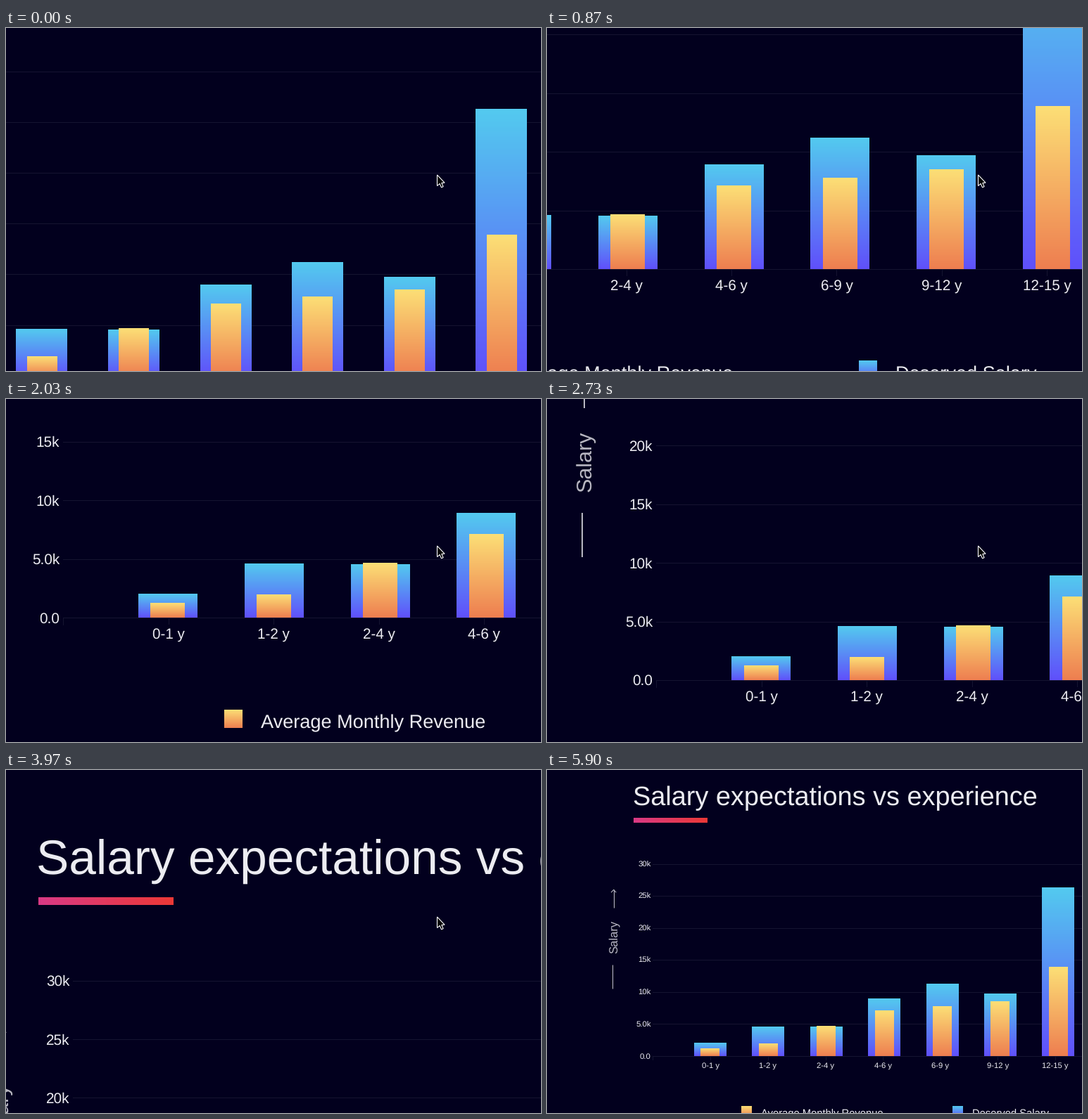
A matplotlib script that plays this animation: 760x488 px, repeating every 5930 ms.

```python
import numpy as np
import matplotlib
import matplotlib.pyplot as plt
from matplotlib.animation import FuncAnimation
from matplotlib.patches import Polygon
from matplotlib.transforms import Affine2D

W, H, DPI = 760, 488, 100
LOOP, FRAMES = 5930, 178
PT = 72 / DPI

BG = "#02001e"
GRID = "#151430"
INK = "#ececf1"
GREY = "#b9b8c2"
BLUE = ("#53caef", "#6050fb")
GOLD = ("#fcdf76", "#ee7e50")
PINK = ("#d93a86", "#ec3836")

K = 16.68          # height of one thousand
PITCH = 150.8      # distance between bars
YEARS = [0, 1, 2, 4, 6, 9, 12, 15]
DESERVED = [2, 4.6, 4.5, 8.93, 11.2, 9.7, 26.3]
REVENUE = [1.2, 1.92, 4.65, 7.08, 7.75, 8.5, 13.85]

matplotlib.rcParams["font.family"] = "Liberation Sans"
matplotlib.rcParams["text.hinting"] = "none"

fig = plt.figure(figsize=(W / DPI, H / DPI), dpi=DPI, facecolor=BG)
ax = fig.add_axes([0, 0, 1, 1])
ax.axis("off")

cam = Affine2D()
world = cam + ax.transData
texts, strokes = [], []


def gradient(x, y, w, h, colors, z=2, across=False):
    a, b = (np.array(matplotlib.colors.to_rgb(c)) for c in colors)
    k = np.linspace(0, 1, 160)[:, None, None]
    ramp = np.repeat(a + (b - a) * k, 2, axis=1)
    if across:
        ramp = ramp.transpose(1, 0, 2)
    im = ax.imshow(ramp, extent=(x, x + w, y + h, y), aspect="auto",
                   interpolation="nearest", zorder=z)
    im.set_transform(world)


def label(x, y, s, px, color=INK, **kw):
    t = ax.text(x, y, s, color=color, va="baseline", transform=world,
                zorder=4, clip_on=True, **kw)
    texts.append((t, px * PT))


def grid(xs, ys):
    ax.plot(xs, ys, color=GRID, lw=PT, transform=world, zorder=1)


def stroke(xs, ys):
    line, = ax.plot(xs, ys, color=GREY, transform=world, zorder=1,
                    solid_capstyle="butt", solid_joinstyle="miter")
    strokes.append(line)


def legend(x, s, colors):
    gradient(x, 131, 26, 26, colors)
    label(x + 51.5, 157, s, 27.1)


def build():
    for k in range(0, 31, 5):
        grid([-107, 1200], [-K * k, -K * k])
        s = f"{k}k" if k > 5 else f"{k:.1f}" + "k" * (k > 0)
        label(-112, 7.3 - K * k, s, 20.8, ha="right")
    grid([-107, -107], [0, 10])

    for i, (big, small) in enumerate(zip(DESERVED, REVENUE)):
        x, mid = PITCH * i, 43 + 149.3 * i
        gradient(x, -K * big, 83.5, K * big, BLUE)
        gradient(x + 17.5, -K * small, 48.5, K * small, GOLD, 3)
        grid([mid, mid], [0, 9])
        label(mid, 30.3, f"{YEARS[i]}-{YEARS[i + 1]} y", 20.6, ha="center")

    label(-159, -652.5, "Salary expectations vs experience", 69.4)
    gradient(-156.5, -619, 192, 11, PINK, across=True)

    label(-200, -268, "Salary", 30.5, GREY, rotation=90,
          rotation_mode="anchor", ha="left")
    stroke([-212, -212], [-238, -175])
    stroke([-209, -209], [-387, -433])
    stroke([-215.5, -209, -202.5], [-426, -433, -426])

    legend(122.5, "Average Monthly Revenue", GOLD)
    legend(671.8, "Deserved Salary", BLUE)


def ease(t, start, end):
    u = np.clip((t - start) / (end - start), 0, 1)
    return u * u * (3 - 2 * u)


def camera(t):
    """Zoom about an anchor, on top of the scroll position."""
    zoom = .866 + .134 * ease(t, 17, 400) - .4535 * ease(t, 4830, 5381)
    x = -229 + 491 * ease(t, 862, 2390) - 152 * ease(t, 3620, 4465)
    y = (539 - 228 * ease(t, 600, 970) + 489 * ease(t, 2400, 3558)
         + 7 * ease(t, 4830, 5000))
    px, py = (613, 210) if t < 2000 else (328, -75)
    return zoom, px + (x - px) * zoom, py + (y - py) * zoom


def pointer(t):
    slide, leave = ease(t, 4450, 4880), ease(t, 5420, 5750)
    return [612.5 - 171 * slide + 28 * leave, 209 + 10.5 * slide - 250 * leave]


build()
ARROW = np.array([(0, 0), (0, 15.6), (3.6, 12.4), (6, 17.8), (8.6, 16.7),
                  (6.3, 11.4), (10.6, 11.2)])
mouse = Polygon(ARROW, closed=True, fc="black", ec="white", lw=1.1 * PT, zorder=6)
ax.add_patch(mouse)
ax.set_xlim(0, W)
ax.set_ylim(H, 0)


def update(i):
    t = (i + .5) * LOOP / FRAMES
    zoom, x, y = camera(t)
    cam.clear().scale(zoom).translate(x, y)
    for text, size in texts:
        text.set_fontsize(size * zoom)
    for line in strokes:
        line.set_linewidth(2 * PT * zoom)
    mouse.set_xy(ARROW + pointer(t))
    return []


anim = FuncAnimation(fig, update, frames=FRAMES, interval=LOOP / FRAMES,
                     repeat=True, repeat_delay=0, blit=False)
plt.show()
```
